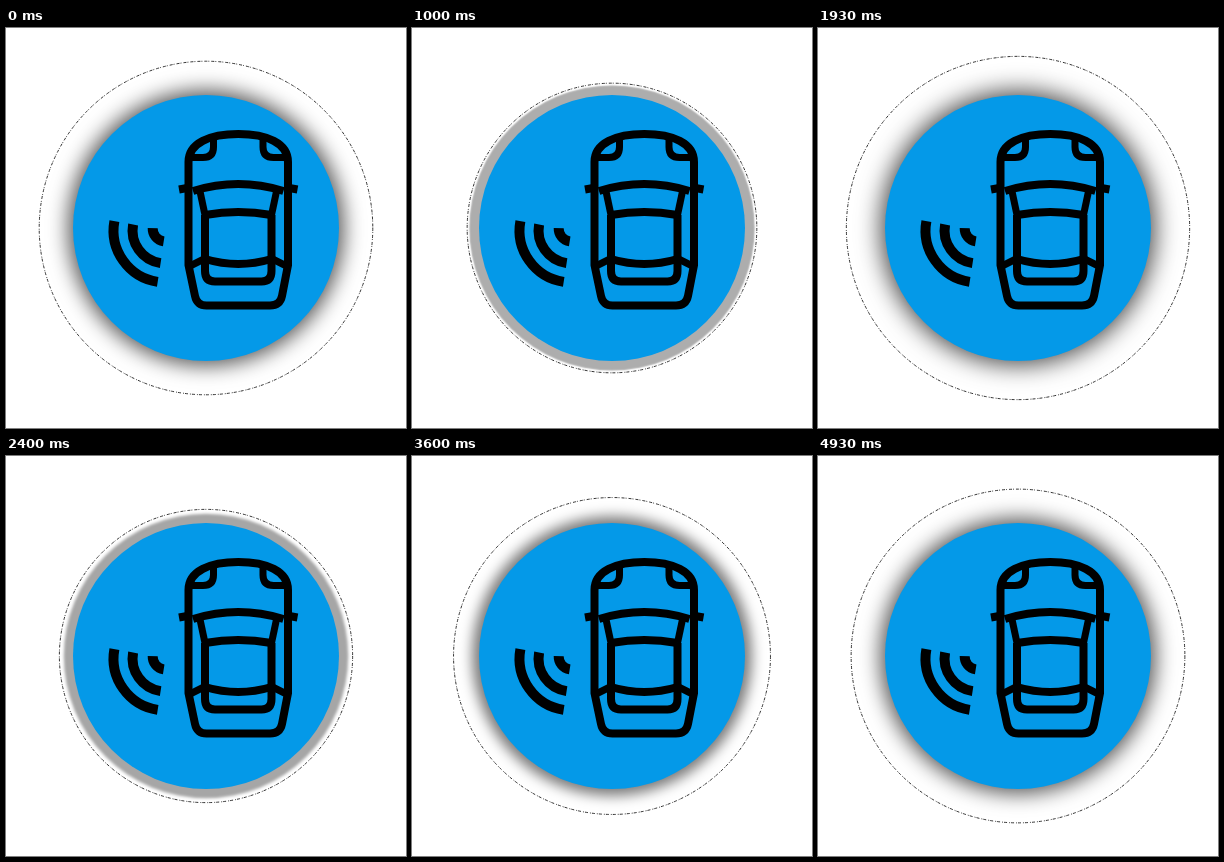
Write an HTML page that moves like this. It is 400x400 px and loops after 4990 ms.

```html
<!DOCTYPE html>
<html lang="en">
<head>
<meta charset="utf-8">
<title>Parking sensor pulse</title>
<style>
  html, body { margin: 0; width: 100%; height: 100%; overflow: hidden; background: #fff; }
  #disc { position: absolute; left: 67px; top: 66.5px; width: 266px; height: 266px; border-radius: 50%; background: #0499e8; }
  svg { position: absolute; left: 0; top: 0; }
</style>
</head>
<body>
<div id="disc"></div>
<svg width="400" height="400" fill="none" stroke="#000">
  <circle id="rim" cx="200" cy="200" stroke-width=".8" stroke-dasharray="3 1 1 2"/>
  <g stroke-width="10">
    <path d="M108.4 193.1A52 52 0 0 0 151.7 253.9"/>
    <path d="M127.1 196.5A33 33 0 0 0 154.6 235.1"/>
    <path d="M146.7 200.1A13 13 0 0 0 157.7 213.4"/>
  </g>
  <g stroke-width="8">
    <path d="M182.5 237V134C182.5 115 204 106 232.3 106S282 115 282 134V237L276 268Q274 277.5 264 277.5H200.5Q191 277.5 189 268Z"/>
    <path d="M187 163Q232.3 149 277.5 163"/>
    <path d="M199 187Q232.3 181 265.5 187"/>
    <path d="M199 187V243Q199 253.5 209 253.5H255.5Q265.5 253.5 265.5 243V187"/>
    <path d="M199 231Q232.3 241 265.5 231"/>
    <g id="side">
      <path d="M207.5 111V119Q207.5 129.5 197 129.5H185" stroke-width="7"/>
      <path d="M173 161.5L184 159.5"/>
      <path d="M193.5 161L199 187" stroke-width="7"/>
      <path d="M184 238L199 230.5" stroke-width="7"/>
    </g>
    <use href="#side" transform="matrix(-1 0 0 1 464.5 0)"/>
  </g>
</svg>
<script>
  const LOOP = 4990, STEP = 1000 / 15;
  // Pulse timing, counted in steps
  const PERIOD = 22, PEAK = 3.6, RISE = 6.7, FALL = 13.5;
  const disc = document.getElementById('disc');
  const rim = document.getElementById('rim');
  const mix = (a, b, p) => a + (b - a) * p;

  function pulse(step) {
    const after = (step - PEAK + PERIOD) % PERIOD;
    const before = PERIOD - after;
    if (after < FALL) return (1 - after / FALL) ** 1.75;
    if (before < RISE) return (1 - before / RISE) ** 0.9;
    return 0;
  }

  function draw() {
    const step = Math.floor((performance.now() % LOOP + 4) / STEP) % 75;
    const p = pulse(step);
    const gray = Math.round(mix(180, 0, p));
    disc.style.boxShadow = `0 0 ${40 * p}px ${mix(10, 0, p)}px rgb(${gray},${gray},${gray})`;
    rim.setAttribute('r', 133 + mix(10, 57.6, p));
    requestAnimationFrame(draw);
  }
  draw();
</script>
</body>
</html>
```
